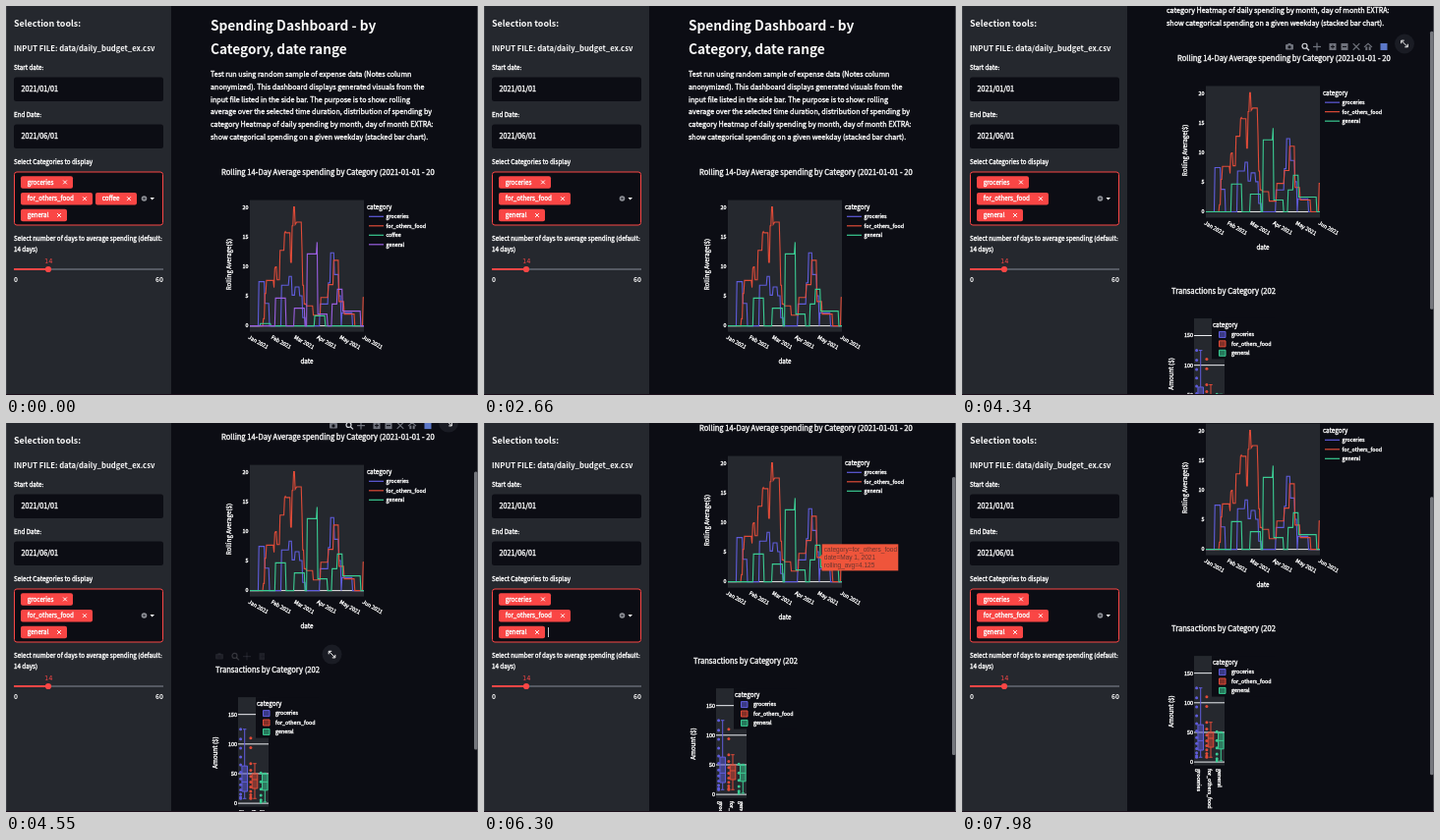
Animation of 480x396 px, one loop 8000 ms. Source, as an HTML page with a canvas:

```html
<!DOCTYPE html>
<html lang="en">
<head>
<meta charset="utf-8">
<title>Spending dashboard</title>
<style>
html, body { margin: 0; overflow: hidden; background: #0c0d14; }
canvas { display: block; }
</style>
</head>
<body>
<canvas id="stage" width="480" height="396"></canvas>
<script>
const ctx = document.getElementById('stage').getContext('2d');
const LOOP = 8000, PAGE = '#0c0d14', PANEL = '#25282e', RED = '#fa4645', WHITE = '#fafafa', GRAY = '#70737d';
const BLUE = '#5f5cdc', CORAL = '#e04b38', GREEN = '#3acb92', PURPLE = '#9a5ee0';
const SANS = '"Noto Sans CJK JP","Noto Sans CJK SC","Noto Sans",sans-serif';
const MONO = '"Noto Sans Mono",monospace', ARIAL = '"Liberation Sans",Arial,sans-serif';

// Each purchase [day, amount, days = 14] lifts the rolling average while it is inside the window.
const spending = {
  groceries: [[12, 3.7, 8], [12, 3.8], [42, 6.9], [52, 1.5], [56, 3.7], [60, 1.4],
    [93, 3.7, 19], [104, 3.6], [107, 5.1], [122, 2.2]],
  for_others_food: [[18, 1.2], [20, 4.3], [22, 2.2], [33, 3.3], [34, 4.5], [40, 5], [46, 3], [47, 3.5], [48, 4.282],
    [56, 6.2], [58, 3.2], [61, 3.7], [62, 4.5, 7], [75, 1.8, 19], [75, 1.6, 9], [94, 4.8], [104, 2.2],
    [108, 4.8, 10], [111, 4.125], [125, 2], [150, 4.8]],
  coffee: [[14, .4], [86, 1.7]],
  general: [[34, 4.7], [59, 3], [76, 12.2], [89, 2], [109, 3.7], [116, 2.5, 31]]
};
const average = (name, day) => spending[name].reduce((sum, [start, amount, days = 14]) =>
  sum + (day >= start && day < start + days ? amount : 0), 0);

const clamp = (v, a = 0, b = 1) => Math.min(b, Math.max(a, v));
const dayX = d => 248 + d * 116 / 151;
const avgY = v => 325 - v * 6;
const amountY = v => 541.5 - v * .603;

function text(str, x, y, size, { color = WHITE, weight = 400, align = 'left', font = SANS, turn = 0 } = {}) {
  ctx.save();
  ctx.translate(x, y);
  ctx.rotate(turn * Math.PI / 180);
  ctx.font = `${weight} ${font === SANS ? size / 1.117 : size}px ${font}`;
  ctx.textAlign = align;
  ctx.fillStyle = ctx.strokeStyle = color;
  ctx.lineWidth = .35;
  ctx.fillText(str, 0, size * .31);
  if (font === SANS && weight === 400) ctx.strokeText(str, 0, size * .31);
  ctx.restore();
}
function rect(x, y, w, h, color) {
  ctx.fillStyle = color;
  ctx.fillRect(x, y, w, h);
}
function rounded(x, y, w, h, r, fill, stroke) {
  ctx.beginPath();
  ctx.roundRect(x, y, w, h, r);
  if (fill) { ctx.fillStyle = fill; ctx.fill(); }
  if (stroke) { ctx.strokeStyle = stroke; ctx.lineWidth = 1; ctx.stroke(); }
}
function disc(x, y, r, color) {
  ctx.beginPath();
  ctx.arc(x, y, r, 0, 7);
  ctx.fillStyle = color;
  ctx.fill();
}
function line(color, width, ...pts) {
  ctx.beginPath();
  for (let i = 0; i < pts.length; i += 2) ctx.lineTo(pts[i], pts[i + 1]);
  ctx.strokeStyle = color;
  ctx.lineWidth = width;
  ctx.stroke();
}
function clipped(x, y, w, h, draw) {
  ctx.save();
  ctx.beginPath();
  ctx.rect(x, y, w, h);
  ctx.clip();
  draw();
  ctx.restore();
}

function cross(x, y, r, color, width) {
  line(color, width, x - r, y - r, x + r, y + r);
  line(color, width, x - r, y + r, x + r, y - r);
}
function tag(label, x, y, w) {
  rounded(x, y, w, 12.5, 2, RED);
  text(label, x + 6.7, y + 6.2, 7);
  cross(x + w - 8, y + 6.2, 1.9, WHITE, 1);
}
function dateField(label, value, y) {
  text(label, 8, y - 10, 7);
  rounded(8, y, 152, 24.5, 2.5, PAGE);
  text(value, 15.5, y + 12, 8);
}

function sidebar(t) {
  rect(0, 0, 168, 396, PANEL);
  text('Selection tools:', 8, 17.5, 10, { weight: 600 });
  text('INPUT FILE: data/daily_budget_ex.csv', 8, 43, 8.6, { weight: 600 });
  dateField('Start date:', '2021/01/01', 72.5);
  dateField('End Date:', '2021/06/01', 120.5);
  text('Select Categories to display', 8, 159, 7);
  rounded(8.5, 169, 151, 54, 2.5, PAGE, RED);
  tag('groceries', 15, 173.2, 53);
  tag('for_others_food', 15, 190, 73);
  if (t < 1610) tag('coffee', 91, 190, 42);
  tag('general', 15, 206.8, 47);
  if (t >= 1610 && t < 7980 && Math.floor((t - 560) / 530) % 2 === 0) rect(65, 208, 1, 10, '#c8c8cc');
  disc(140.5, 196, 2.8, '#8d8f96');
  cross(140.5, 196, 1, PAGE, .7);
  ctx.beginPath();
  ctx.moveTo(146.5, 195);
  ctx.lineTo(151, 195);
  ctx.lineTo(148.7, 197.5);
  ctx.fillStyle = WHITE;
  ctx.fill();
  text('Select number of days to average spending (default:', 8, 237, 7);
  text('14 days)', 8, 248, 7);
  text('14', 43.3, 260, 7, { color: RED, align: 'center', font: MONO });
  rect(8, 267, 152, 2, '#555962');
  rect(8, 267, 35, 2, RED);
  disc(43, 268, 3.1, RED);
  text('0', 8, 279, 7.5, { weight: 600 });
  text('60', 160, 279, 7.5, { weight: 600, align: 'right' });
}

function intro() {
  text('Spending Dashboard - by', 208, 20, 15.3, { weight: 600 });
  text('Category, date range', 208, 43.5, 15.3, { weight: 600 });
  [
    'Test run using random sample of expense data (Notes column',
    'anonymized). This dashboard displays generated visuals from the',
    'input file listed in the side bar. The purpose is to show: rolling',
    'average over the selected time duration, distribution of spending by',
    'category Heatmap of daily spending by month, day of month EXTRA:',
    'show categorical spending on a given weekday (stacked bar chart).'
  ].forEach((row, i) => text(row, 208, 69 + i * 12.75, 8));
}

function expandButton(x, y) {
  disc(x, y, 10, '#1a1c24');
  line(WHITE, 1, x - 2.8, y - 2.8, x + 2.8, y + 2.8);
  for (const s of [-1, 1]) line(WHITE, 1, x + s * 3.3, y + s * .3, x + s * 3.3, y + s * 3.3, x + s * .3, y + s * 3.3);
}
function toolbar(x, y, alpha) {
  ctx.save();
  ctx.globalAlpha = alpha;
  ctx.translate(x, y);
  rounded(-4, -2.5, 8, 5.5, 1, GRAY);
  rect(-1.5, -3.5, 3, 1.5, GRAY);
  disc(0, .3, 1.6, PAGE);
  ctx.beginPath();
  ctx.arc(15.5, -.7, 2.5, 0, 7);
  ctx.strokeStyle = '#d5d7dd';
  ctx.lineWidth = 1.2;
  ctx.stroke();
  line('#d5d7dd', 1.3, 17.3, 1.1, 20, 3.8);
  line(GRAY, 1.2, 24, 0, 32, 0);
  line(GRAY, 1.2, 28, -4, 28, 4);
  for (const cx of [44, 56]) {
    rect(cx - 3.5, -3.5, 7, 7, GRAY);
    line(PAGE, 1, cx - 2, 0, cx + 2, 0);
  }
  line(PAGE, 1, 44, -2, 44, 2);
  cross(68, 0, 3.3, GRAY, 1.1);
  line(GRAY, 1.1, 76, .5, 80, -3.2, 84, .5);
  rect(77.3, 0, 2, 3.5, GRAY);
  rect(80.7, 0, 2, 3.5, GRAY);
  rect(92.5, -3.5, 7, 7, '#5c78c8');
  ctx.restore();
}

function averageLine(name, color) {
  const pts = [];
  for (let d = 0; d <= 151; d++) pts.push(dayX(d), avgY(average(name, d)));
  line(color, 1.1, ...pts);
}

function averageChart(series) {
  clipped(208, 150, 228, 30, () =>
    text('Rolling 14-Day Average spending by Category (2021-01-01 - 2021-06-01)', 219, 168.5, 8.5));
  rect(248, 197, 116, 134, PANEL);
  rect(248, 324.5, 116, 1, '#e8e8e8');
  clipped(248, 197, 116.5, 134, () => series.forEach(s => averageLine(...s)));
  for (let v = 0; v <= 20; v += 5) text(v, 246.5, avgY(v), 6, { align: 'right' });
  ['Jan', 'Feb', 'Mar', 'Apr', 'May', 'Jun'].forEach((month, i) =>
    text(month + ' 2021', dayX(i * 30.2) - 1, 336, 6, { turn: 30 }));
  text('Rolling Average($)', 227, 262.5, 7, { align: 'center', turn: -90 });
  text('date', 306, 361, 7, { align: 'center' });
  text('category', 367, 204, 7);
  series.forEach(([name, color], i) => {
    const y = 213.7 + i * 9.5;
    line(color, 1.2, 369, y, 384, y);
    text(name, 386.5, y, 6);
  });
}

function tooltip(day) {
  const value = average('for_others_food', day), x = dayX(day) + 3.6, y = avgY(value);
  const date = new Date(Date.UTC(2021, 0, 1 + day))
    .toLocaleDateString('en-US', { month: 'short', day: 'numeric', year: 'numeric', timeZone: 'UTC' });
  ctx.beginPath();
  ctx.moveTo(x - 3, y);
  ctx.lineTo(x, y - 3);
  ctx.lineTo(x, y + 3);
  ctx.fillStyle = '#ef553b';
  ctx.fill();
  rect(x, y - 13.5, 77.5, 27, '#ef553b');
  ['category=for_others_food', 'date=' + date, 'rolling_avg=' + value.toFixed(3)].forEach((row, i) =>
    text(row, x + 2, y - 8.3 + i * 8.4, 6.5, { color: '#6b3630', font: ARIAL }));
}

function boxPlot(cx, color, low, q1, mid, q3, high, count) {
  const x = cx + 1.5, top = amountY(q3), bottom = amountY(q1);
  line(color, 1, x, amountY(low), x, bottom);
  line(color, 1, x, top, x, amountY(high));
  for (const v of [low, high]) line(color, 1, x - 1.7, amountY(v), x + 1.7, amountY(v));
  rounded(x - 2.8, top, 5.6, bottom - top, 0, color + '80', color);
  line(color, 1, x - 2.8, amountY(mid), x + 2.8, amountY(mid));
  for (let i = 0; i <= count; i++) disc(cx - 2.6, amountY(low + (high - low) * (i / count) ** 1.6), 1.5, color);
}

function transactionsChart() {
  text('Transactions by Category (202', 213, 405.5, 8.5);
  rect(236, 433.5, 31, 111.5, PANEL);
  for (let v = 0; v <= 150; v += 50) {
    rect(236, amountY(v) - .5, 31, 1, '#eceef2');
    text(v, 235, amountY(v), 6, { align: 'right' });
  }
  boxPlot(241.2, BLUE, 8, 20, 36, 63, 125, 11);
  boxPlot(251.5, CORAL, 8, 25, 40, 50, 67, 8);
  for (const v of [94, 110]) disc(248.9, amountY(v), 1.5, CORAL);
  boxPlot(261.8, GREEN, 2, 22, 36, 49, 51, 5);
  rect(254, 433.5, 64, 41.5, PAGE);
  text('category', 255, 440, 7);
  ['groceries', 'for_others_food', 'general'].forEach((name, i) => {
    const color = [BLUE, CORAL, GREEN][i], y = 450 + i * 9.4;
    rounded(261.5, y - 3, 6.5, 6, 0, color + '90', color);
    text(name, 274, y, 6);
    text(name, 241.2 + i * 10.3, 548.5, 6, { turn: 90 });
  });
  text('Amount ($)', 212.5, 490, 7, { align: 'center', turn: -90 });
}

function scrollAt(t) {
  const first = 164 * (1 - (1 - clamp((t - 4060) / 700)) ** 2.4);
  return first + 33 * clamp((t - 7580) / 400) ** 2;
}
function hoverDay(t) {
  if (t >= 3400 && t < 4130) return 4 + 46 * clamp((t - 3400) / 520);
  if (t >= 4900 && t < 7070) return 120 + (t - 6300) / (t < 6300 ? 41 : 47);
  return null;
}

function draw(t) {
  const scroll = scrollAt(t), day = hoverDay(t);
  const series = [['groceries', BLUE], ['for_others_food', CORAL],
    ...(t < 2240 ? [['coffee', GREEN], ['general', PURPLE]] : [['general', GREEN]])];
  rect(0, 0, 480, 396, PAGE);
  ctx.save();
  ctx.translate(0, .6 - scroll);
  intro();
  averageChart(series);
  transactionsChart();
  if (t >= 3220 && t < 4760) {
    toolbar(333, 157, 1);
    expandButton(450, 154);
  }
  if (t >= 4400 && t < 4760) {
    clipped(208, 380, 55, 20, () => toolbar(217, 392, .2));
    expandButton(331.5, 390);
  }
  if (day !== null) tooltip(Math.round(day));
  ctx.restore();
  sidebar(t);
  rect(0, 0, 1, 396, '#3a3d43');
  rect(479, 0, 1, 396, '#4a4b51');
  if (t >= 3500) rounded(476, -45 + scroll * .61, 3.5, 283, 1.5, '#74767c');
  rect(0, 395, 480, 1, '#1c0f1b');
}

function tick() {
  draw(performance.now() % LOOP);
  requestAnimationFrame(tick);
}
tick();
</script>
</body>
</html>
```
